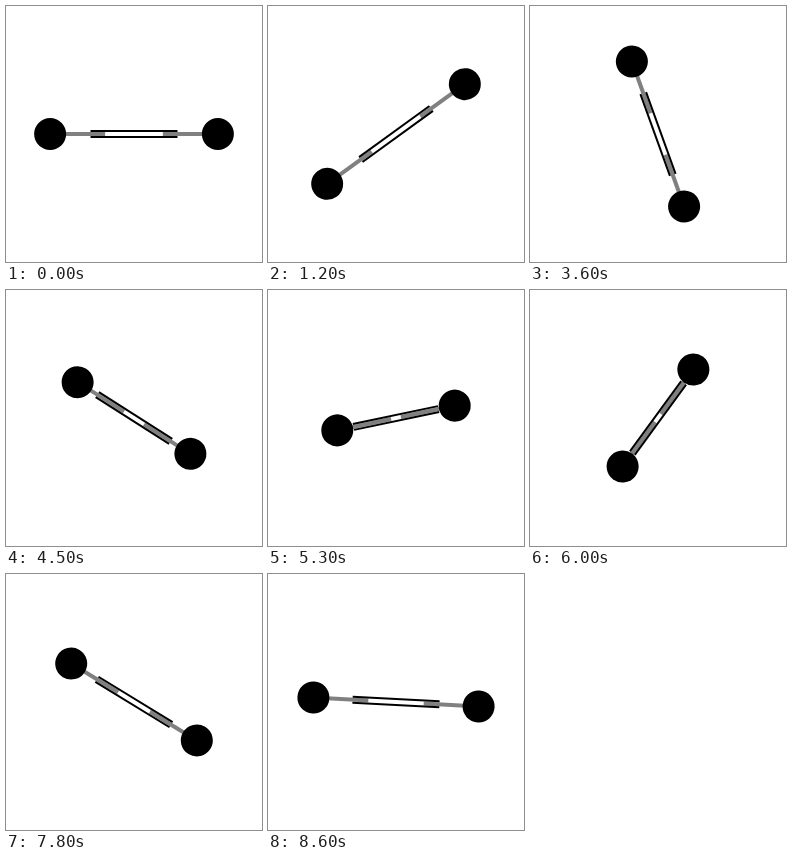
An HTML page with a canvas that plays this animation: 256 px wide and 256 px high, repeating every 8700 ms.

```html
<!DOCTYPE html>
<html lang="en">
<head>
<meta charset="utf-8">
<title>Spinning dumbbell</title>
<style>
  html, body { margin: 0; width: 100%; height: 100%; overflow: hidden; background: #fff; }
  canvas { display: block; width: 256px; height: 256px; }
</style>
</head>
<body>
<canvas id="stage" width="256" height="256"></canvas>
<script>
const ctx = document.getElementById('stage').getContext('2d');

const STEP = 100, STEPS = 87;
const FAR = 85, NEAR = 60;            // ball distance from the centre
const PULL = 29, HELD = 51, RELEASE = 66, OUT = 88; // in steps
const BALL = 16, ROD = 55, TUBE = 43.5;

const clamp01 = x => Math.max(0, Math.min(1, x));

function radius(step) {
  const s = step < 1 ? step + STEPS : step;
  const pull = clamp01((s - PULL) / (HELD - PULL));
  const release = clamp01((s - RELEASE) / (OUT - RELEASE));
  return FAR + (NEAR - FAR) * (pull - release);
}

// Angular momentum is conserved, so the turn rate follows 1 / r².
const SUB = 20;
const turned = [0];
for (let i = 0; i < STEPS * SUB; i++) {
  turned.push(turned[i] + 1 / radius((i + 0.5) / SUB) ** 2);
}
const fullTurn = turned[STEPS * SUB];
const angle = step => 2 * Math.PI * turned[step * SUB] / fullTurn;

function bar(x, y, w, h, color) {
  ctx.fillStyle = color;
  ctx.fillRect(x, y, w, h);
}

function draw(step) {
  const r = radius(step);
  ctx.setTransform(1, 0, 0, 1, 0, 0);
  bar(0, 0, 256, 256, '#fff');
  ctx.translate(128, 128);
  ctx.rotate(-angle(step));

  bar(-r, -2, ROD, 4, '#808080');
  bar(r - ROD, -2, ROD, 4, '#808080');
  bar(-TUBE, -4, 2 * TUBE, 2, '#000');
  bar(-TUBE, 2, 2 * TUBE, 2, '#000');

  for (const x of [-r, r]) {
    ctx.beginPath();
    ctx.arc(x, 0, BALL, 0, 2 * Math.PI);
    ctx.fill();
  }
}

const start = performance.now();
function tick() {
  const t = Math.max(0, performance.now() - start);
  draw(Math.floor(t / STEP) % STEPS);
  requestAnimationFrame(tick);
}
tick();
</script>
</body>
</html>
```
